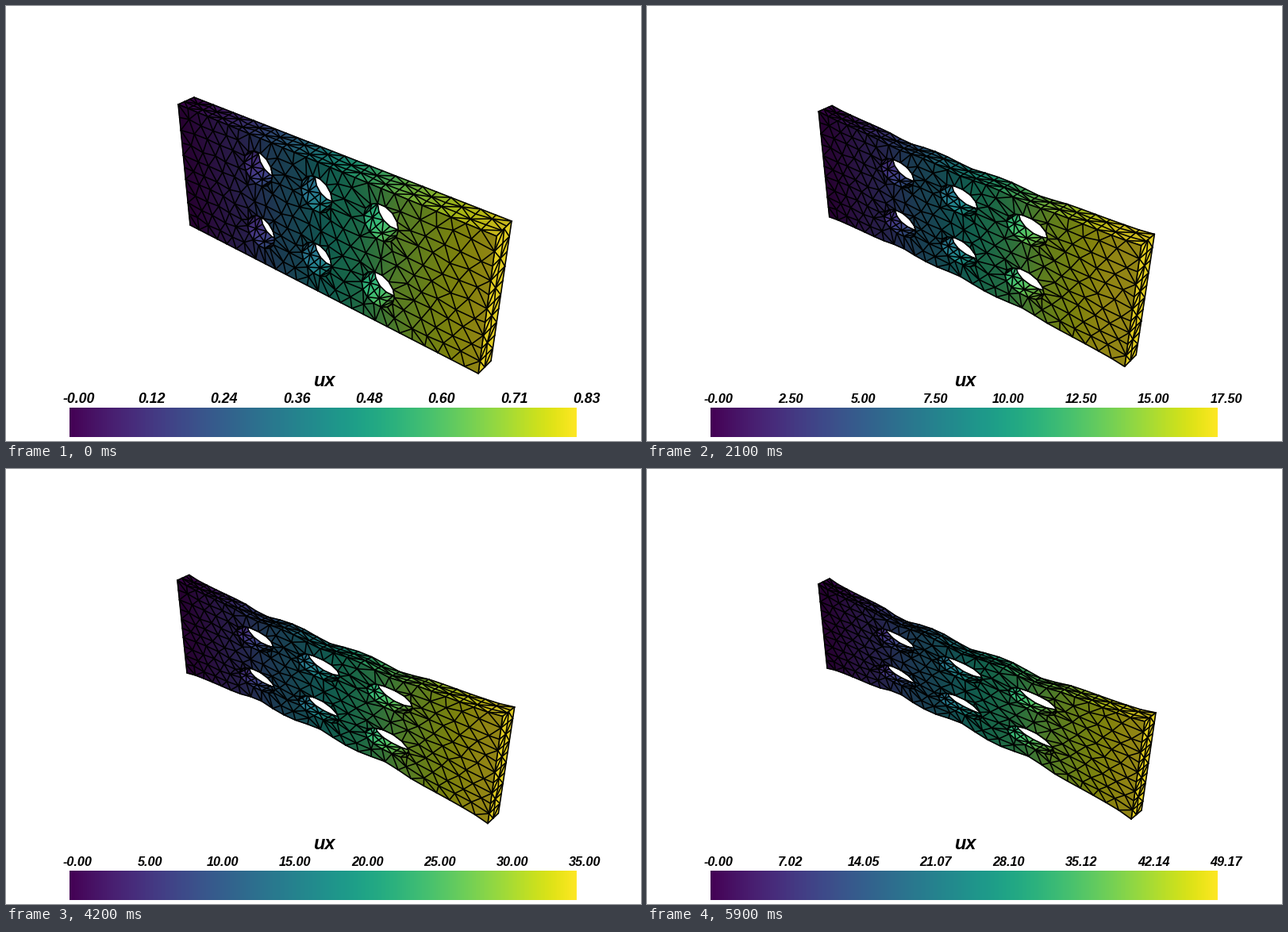
Write a matplotlib script that moves like this. It is 800x548 px and loops after 6000 ms.

```python
import numpy as np
import matplotlib.pyplot as plt
from matplotlib.animation import FuncAnimation
from matplotlib.collections import LineCollection, TriMesh
from matplotlib.tri import Triangulation

WIDTH, HEIGHT, DPI = 800, 548, 100
FRAMES, INTERVAL = 60, 100
LENGTH, DEPTH = 100.0, 40.0      # plate size, y runs downwards
RADIUS, RIM = 5.15, 14
HOLES = [(x, y) for y in (9.5, 29.7) for x in (29.5, 49.5, 69.6)]
PULL = 0.5                       # final stretch relative to the length
MID = 0.49
PX = 72 / DPI

# Screen corners (top left, top right, bottom right, bottom left)
# at the start, the middle and the end of the pull.
FRONT = np.array([
    [(217, 124), (618, 290), (595, 463), (232, 276)],
    [(216, 136), (624, 306), (604, 451), (229, 262)],
    [(216, 145), (627, 318), (610, 441), (227, 251)]], float)
BACK = np.array([
    [(237, 115), (637, 271), (611, 447), (249.5, 267)],
    [(232, 129), (640, 293), (618, 437), (243, 255)],
    [(230, 138), (641, 307), (623, 430), (239.5, 245)]], float)

rng = np.random.default_rng(7)
viridis = plt.get_cmap("viridis")


def blend(keys, s):
    """Quadratic through three key poses at s = 0, 0.5 and 1."""
    a, b, c = keys
    return a + s * (4 * b - 3 * a - c) + 2 * s * s * (a - 2 * b + c)


def homography(corners):
    """Map the unit square onto four screen corners."""
    rows, rhs = [], []
    for (u, v), (x, y) in zip([(0, 0), (1, 0), (1, 1), (0, 1)], corners):
        rows += [[u, v, 1, 0, 0, 0, -u * x, -v * x],
                 [0, 0, 0, u, v, 1, -u * y, -v * y]]
        rhs += [x, y]
    return np.append(np.linalg.solve(rows, rhs), 1).reshape(3, 3)


def project(matrix, uv):
    p = np.column_stack([uv, np.ones(len(uv))]) @ matrix.T
    return p[:, :2] / p[:, 2:]


def displacement(uvw):
    """Final shift of plate points in units of the stretched plate."""
    u, v, w = uvw.T
    neck = 0.075 * np.clip(4 * u * (1 - u), 0, 1) ** 0.6
    for x, _ in HOLES[:3]:
        neck = neck + 0.04 * np.exp(-((u - x / LENGTH) / 0.05) ** 2)
    du = -0.017 * np.sin(2 * np.pi * u)
    dv = -2 * neck * (v - MID)
    dw = -2.4 * neck * (w - 0.5)
    clamp = np.clip(np.minimum(u, 1 - u) / 0.1, 0, 1)
    for x, y in HOLES:
        dx, dy = u * LENGTH - x, v * DEPTH - y
        r = np.maximum(np.hypot(dx, dy), RADIUS)
        fall = clamp * (RADIUS / r) ** 2 / r
        du = du + 0.0165 * fall * dx
        dv = dv - 0.009 * fall * dy
    return np.column_stack([du, dv, dw])


def circle(x, y, r, n):
    a = 2 * np.pi * np.arange(n) / n
    return np.column_stack([x + r * np.cos(a), y + r * np.sin(a)])


def hole_distance(p):
    return np.min([np.hypot(p[:, 0] - x, p[:, 1] - y) for x, y in HOLES], axis=0)


def side(start, end, n):
    return np.linspace(start, end, n + 1)


TOP = side((0, 0), (LENGTH, 0), 26)
RIGHT = side((LENGTH, 0), (LENGTH, DEPTH), 10)


def face_mesh():
    """Unstructured triangles over the perforated front face."""
    parts = [TOP, TOP + (0, DEPTH), RIGHT[1:-1], RIGHT[1:-1] - (LENGTH, 0)]
    parts += [circle(x, y, RADIUS, RIM) for x, y in HOLES]
    step = 4.8
    grid = []
    for j, y in enumerate(np.arange(3.6, DEPTH - 2, step * 0.85)):
        xs = np.arange(3.4 + (j % 2) * step / 2, LENGTH - 2, step)
        grid.append(np.column_stack([xs, np.full(len(xs), y)]))
    grid = np.vstack(grid)
    grid = grid + rng.uniform(-0.55, 0.55, grid.shape)
    parts.append(grid[hole_distance(grid) > RADIUS + 1.9])
    pts = np.vstack(parts)
    tris = Triangulation(*pts.T).triangles
    keep = hole_distance(pts[tris].mean(axis=1)) > 0.97 * RADIUS
    return np.column_stack([pts, np.zeros(len(pts))]), tris[keep]


def strip_mesh(path, layers=2, closed=False):
    """Rows of triangles through the thickness along a path."""
    n = len(path)
    rows = []
    for k in range(layers + 1):
        depth = np.full(n, k / layers)
        if 0 < k < layers:
            depth += rng.uniform(-0.08, 0.08, n)
        rows.append(np.column_stack([path, depth]))
    tris = []
    for k in range(layers):
        for i in range(n if closed else n - 1):
            j = (i + 1) % n
            a, b, c, d = k * n + i, k * n + j, (k + 1) * n + j, (k + 1) * n + i
            tris += [(a, b, c), (a, c, d)] if (i + k) % 2 else [(a, b, d), (b, c, d)]
    return np.vstack(rows), np.array(tris)


class Part:
    """Shaded surface piece with its mesh lines."""

    def __init__(self, ax, mesh, shade, z):
        pts, tris = mesh
        self.rest = pts / (LENGTH, DEPTH, 1)
        self.shift = displacement(self.rest)
        self.shade = np.broadcast_to(shade, len(pts))[:, None]
        u = self.rest[:, 0]
        self.ux = ((u + self.shift[:, 0]) * (1 + PULL) - u) / PULL
        self.tri = Triangulation(*pts[:, :2].T, tris)
        self.edges = self.tri.edges
        self.surface = TriMesh(self.tri, zorder=z)
        ax.add_collection(self.surface, autolim=False)
        self.lines = LineCollection([], colors="black", linewidths=1.6 * PX,
                                    capstyle="round", zorder=z + 0.5)
        ax.add_collection(self.lines, autolim=False)

    def update(self, front, back, amount, gain):
        pos = self.rest + amount * self.shift
        uv, w = pos[:, :2], pos[:, 2:]
        xy = (1 - w) * project(front, uv) + w * project(back, uv)
        self.tri.x, self.tri.y = xy[:, 0].copy(), xy[:, 1].copy()
        self.lines.set_segments(xy[self.edges])
        colors = viridis(np.clip(self.ux * gain, 0, 1))
        colors[:, :3] *= self.shade
        self.surface.set_facecolor(colors)


fig = plt.figure(figsize=(WIDTH / DPI, HEIGHT / DPI), dpi=DPI, facecolor="white")
ax = fig.add_axes([0, 0, 1, 1])
ax.axis("off")

ax.imshow(np.linspace(0, 1, 256)[None, :], cmap="viridis", aspect="auto",
          interpolation="nearest", extent=(80, 719, 543, 506))
ax.set_xlim(0, WIDTH)
ax.set_ylim(HEIGHT, 0)

# Hole walls are lit from the right and from above.
angle = 2 * np.pi * np.arange(RIM) / RIM
lit = 0.9 * np.maximum(-np.cos(angle), 0) + 0.8 * np.maximum(np.sin(angle), 0)
wall_shade = np.tile(np.clip(lit, 0.4, 1), 3)

parts = [Part(ax, strip_mesh(circle(x, y, RADIUS, RIM), closed=True), wall_shade, 2)
         for x, y in HOLES]
parts += [Part(ax, strip_mesh(TOP, layers=3), 0.8, 3),
          Part(ax, strip_mesh(RIGHT), 0.88, 4),
          Part(ax, face_mesh(), 0.575, 5)]

style = dict(family="Liberation Sans", weight="bold", style="italic",
             ha="center", va="baseline", color="black")
ax.text(400.5, 479, "ux", fontsize=23.5 * PX, **style)
labels = [ax.text(0, 500.5, "", **style) for _ in range(8)]


def draw(frame):
    s = frame / (FRAMES - 1)
    front, back = homography(blend(FRONT, s)), homography(blend(BACK, s))
    # The colour range lags one load step behind the plate.
    bound = max(frame, 1)
    gain = (frame + 1) / bound
    for part in parts:
        part.update(front, back, s * (1.5 - 0.5 * s), gain)

    top = bound * 50 / 60
    wide = top > 9.995
    for k, label in enumerate(labels):
        label.set_text(f"{top * k / 7:.2f}" if k else "-0.00")
        label.set_x((89.7 if wide else 92) + 91.4 * k)
        label.set_fontsize((16.2 if wide else 17.8) * PX)
    return []


anim = FuncAnimation(fig, draw, frames=FRAMES, interval=INTERVAL,
                     init_func=lambda: draw(0), repeat=True, repeat_delay=0)
plt.show()
```
